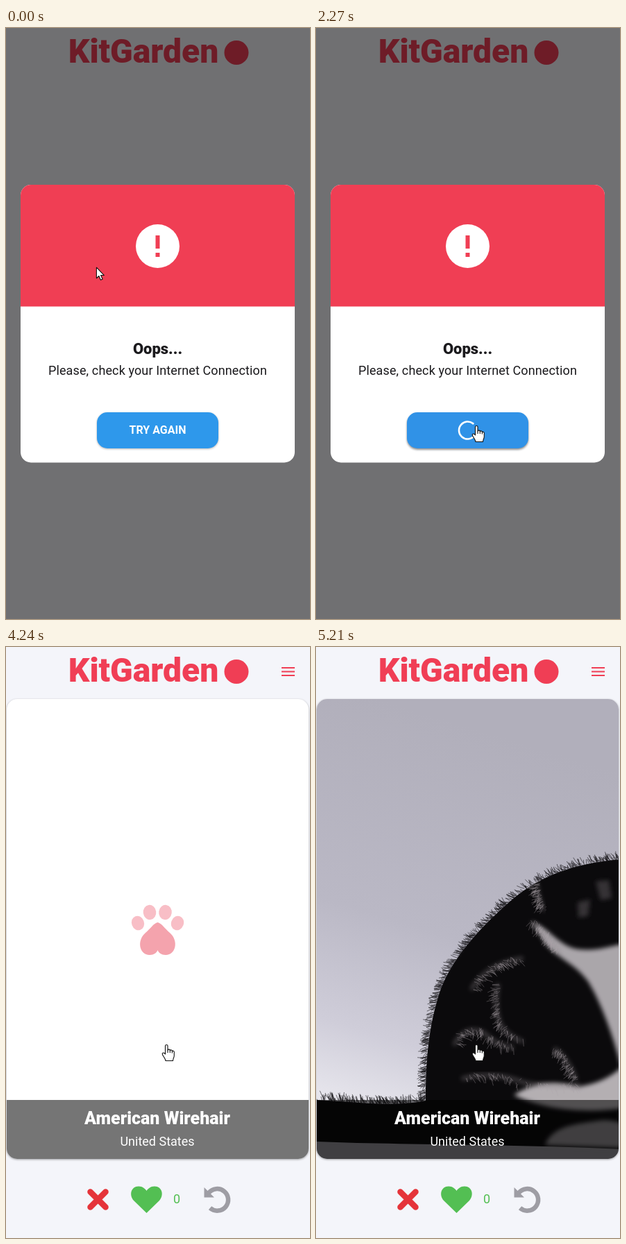
An HTML page that plays this animation: 438x852 px, repeating every 5.45 s.

```html
<!DOCTYPE html>
<html lang="en">
<head>
<meta charset="utf-8">
<title>Cat cards</title>
<style>
  html, body { margin: 0; width: 100%; height: 100%; overflow: hidden; background: #f4f5fa; }
  svg { display: block; width: 100%; height: 100%; }
  text { font-family: Roboto, Arial, sans-serif; font-size: 18px; text-anchor: middle; }
  .black { font-weight: 900; }
  .line { fill: none; stroke-linecap: round; }
</style>
</head>
<body>
<svg id="stage" viewBox="0 0 438 852">
  <defs>
    <clipPath id="cardClip"><rect x="1" y="75" width="435" height="663" rx="15"/></clipPath>
    <clipPath id="modalClip"><rect x="21" y="226" width="395" height="400.500" rx="15"/></clipPath>
    <clipPath id="buttonClip"><rect x="131" y="554" width="175" height="52" rx="15"/></clipPath>
    <linearGradient id="wall" x1=".2" y1="0" x2="0" y2="1">
      <stop offset="0" stop-color="#b1afbb"/>
      <stop offset=".45" stop-color="#bab8c5"/>
      <stop offset=".7" stop-color="#cfcdd9"/>
      <stop offset=".86" stop-color="#e6e5ec"/>
    </linearGradient>
    <filter id="soft" x="-30%" y="-30%" width="160%" height="160%"><feGaussianBlur stdDeviation="3"/></filter>
    <filter id="shade" x="-20%" y="-20%" width="140%" height="150%"><feGaussianBlur stdDeviation="1.500"/></filter>
  </defs>

  <rect width="438" height="852" fill="#f4f5fa"/>
  <g fill="#f03e55">
    <text x="198" y="49.500" class="black" style="font-size:48px">KitGarden</text>
    <circle cx="332" cy="35.500" r="17.500"/>
  </g>

  <g id="page">
    <path class="line" d="M397 30H416M397 35.500H416M397 41H416" stroke="#f03e55" stroke-width="2" style="stroke-linecap:butt"/>
    <rect x="1" y="76" width="435" height="663" rx="15" fill="#000" opacity=".35" filter="url(#shade)"/>
    <g clip-path="url(#cardClip)">
      <rect y="75" width="438" height="664" fill="#fff"/>
      <g id="paw">
        <g fill="#f7b0b9">
          <ellipse cx="190" cy="398" rx="9" ry="10.500" transform="rotate(-20 190 398)"/>
          <ellipse cx="207" cy="382.500" rx="9.300" ry="10.700" transform="rotate(-8 207 382.500)"/>
          <ellipse cx="229.500" cy="382.500" rx="9.300" ry="10.700" transform="rotate(8 229.500 382.500)"/>
          <ellipse cx="247" cy="398" rx="9" ry="10.500" transform="rotate(20 247 398)"/>
        </g>
        <path fill="#f28e9b" d="M218.500 397C213 398 208 406 201 412C188 423 192 444 207 444C213 444 217 441 218.500 437C220 441 224 444 230 444C245 444 249 423 236 412C229 406 224 398 218.500 397Z"/>
      </g>
      <g id="photo">
        <rect y="75" width="438" height="664" fill="url(#wall)"/>
        <rect y="690" width="438" height="50" fill="#8b8a90"/>
        <path id="outline" fill="none" d="M440 306C370 312 325 330 285 362C235 405 195 450 178 498C163 545 158 590 158 654C110 664 50 655 0 653"/>
        <path fill="#0b0a0c" d="M440 306C370 312 325 330 285 362C235 405 195 450 178 498C163 545 158 590 158 654C110 664 50 655 0 653V713C120 718 260 716 440 724Z"/>
        <g filter="url(#soft)">
          <path fill="#aaa6aa" d="M312 397C335 405 345 425 370 434C395 440 415 434 442 428V615C430 565 412 515 392 482C372 455 345 447 330 427Z"/>
          <path fill="#b4afb2" d="M285 646C320 622 355 628 378 634C402 630 424 622 442 604V665C390 672 330 668 285 646Z"/>
          <path fill="#8b888b" d="M330 718C340 692 370 688 400 684C420 680 430 684 442 686V722Z"/>
          <path fill="#343235" d="M377 368L395 364 392 388 378 390ZM403 338L422 336 426 362 410 365Z"/>
        </g>
        <g id="fur" class="line"></g>
      </g>
      <rect y="653" width="438" height="86" fill="#000" opacity=".54"/>
    </g>
    <g fill="#fff">
      <text x="218" y="688" class="black" style="font-size:25px">American Wirehair</text>
      <text x="218" y="719">United States</text>
    </g>
    <path class="line" d="M121.500 785.500L143.500 807.500M143.500 785.500L121.500 807.500" stroke="#e5343a" stroke-width="8.500"/>
    <path fill="#53bf53" d="M202.500 816L184 798C177 790 180 777.500 191 777.500C197 777.500 200.500 781 202.500 784C204.500 781 208 777.500 214 777.500C225 777.500 228 790 221 798Z"/>
    <text x="246" y="801.500" fill="#53bf53">0</text>
    <g fill="#9e9da4">
      <path class="line" d="M292 787A15.800 15.800 0 1 1 294 808.800" stroke="#9e9da4" stroke-width="6.500" style="stroke-linecap:butt"/>
      <path d="M285.500 779V793.500H300Z"/>
    </g>
  </g>

  <g id="dialog">
    <rect width="438" height="852" opacity=".54"/>
    <g clip-path="url(#modalClip)">
      <rect x="21" y="226" width="395" height="401" fill="#fff"/>
      <rect x="21" y="226" width="395" height="175.500" fill="#f03e54"/>
    </g>
    <circle cx="218.500" cy="314.500" r="31.500" fill="#fff"/>
    <path d="M215.500 299H221.500V318H215.500ZM215.500 324H221.500V330H215.500Z" fill="#f03e54"/>
    <g fill="#1b1a1d">
      <text x="218.500" y="470" class="black" style="font-size:22px">Oops...</text>
      <text x="218.500" y="500" style="letter-spacing:.12px">Please, check your Internet Connection</text>
    </g>
    <rect id="shadow" x="131" width="175" height="52" rx="15" filter="url(#shade)"/>
    <g clip-path="url(#buttonClip)">
      <rect id="button" x="131" y="554" width="175" height="52"/>
      <circle id="ripple" cx="232" cy="580" fill="#1b62b8"/>
    </g>
    <text id="label" x="218.500" y="585" fill="#fff" style="font-size:16px;font-weight:700">TRY AGAIN</text>
    <circle id="spinner" r="12.500" class="line" stroke="#fff" stroke-width="2.600" pathLength="360" style="stroke-linecap:square"/>
  </g>

  <g id="cursor" fill="#fff" stroke="#111" stroke-width="1.100" stroke-linejoin="round">
    <path id="arrow" d="M.5 0V15.500L4 12.300L6.500 18L9.200 16.800L6.700 11.300H11.500Z"/>
    <g id="hand">
      <path d="M-1.500 2C-1.500 0 2 0 2 2V8C3 6.500 5.200 7 5.300 8.500C6.500 7.300 8.300 8 8.400 9.500C9.700 8.700 11.300 9.500 11.300 11V16C11.300 19 9.500 20 9.500 23.500H-1C-1 20.500 -5.800 16 -5.800 13.500C-5.800 11.500 -3 11.500 -1.500 14Z"/>
      <path d="M2 8V12M5.300 8.500V12M8.400 9.500V12.500" fill="none"/>
    </g>
  </g>
</svg>

<script>
const LOOP = 5450;
const HOVER = 500, PRESS = 1550, LOADING = 1700, PAGE_READY = 3240, DIALOG_CLOSED = 3820, PHOTO_READY = 4270;
const el = id => document.getElementById(id);
const set = (id, attributes) => Object.entries(attributes).forEach(([k, v]) => el(id).setAttribute(k, v));
const show = (id, visible) => { el(id).style.display = visible ? "" : "none"; };
const clamp = v => Math.min(1, Math.max(0, v));
const progress = (t, start, duration) => clamp((t - start) / duration);
const mix = (a, b, p) => a + (b - a) * p;

let seed = 7;
const random = () => (seed = (seed * 16807) % 2147483647) / 2147483647;

function svgPath(d, stroke, width, opacity = 1) {
  const path = document.createElementNS("http://www.w3.org/2000/svg", "path");
  Object.entries({ d, stroke, "stroke-width": width, opacity, fill: "none" })
    .forEach(([k, v]) => path.setAttribute(k, v));
  return el("fur").appendChild(path);
}

// Short curved hairs growing outward from a guide line.
function growHairs(guide, count, length, color, spread, opacity) {
  const total = guide.getTotalLength();
  let d = "";
  for (let i = 0; i < count; i++) {
    const at = random() * total;
    const a = guide.getPointAtLength(at), b = guide.getPointAtLength(Math.min(total, at + 1));
    const tx = b.x - a.x, ty = b.y - a.y;
    const out = length * (0.3 + random()), lean = length * (random() - 0.2);
    const x = a.x + (random() - 0.5) * spread, y = a.y + (random() - 0.5) * spread;
    const dx = -ty * out + tx * lean, dy = tx * out + ty * lean;
    d += `M${x} ${y}q${dx * 0.6} ${dy * 0.4} ${dx} ${dy}`;
  }
  svgPath(d, color, 0.8, opacity);
}

growHairs(el("outline"), 750, 9, "#171519", 4, 0.75);
const markings = [
  "M318 342Q318 360 328 378",
  "M225 492Q245 458 296 449",
  "M262 488Q256 520 266 545Q278 562 296 568",
  "M200 572Q215 545 240 555Q262 575 282 577",
  "M212 622Q255 610 300 628Q340 636 378 632",
  "M345 580Q362 592 374 622",
  "M312 398Q330 412 350 438"
];
for (const d of markings) {
  const guide = svgPath(d, "#8d868b", 6, 0.38);
  guide.setAttribute("filter", "url(#soft)");
  growHairs(guide, 75, 8, "#aaa3a7", 10, 0.45);
}

function cubicEase(x1, y1, x2, y2) {
  const bezier = (a, b, u) => 3 * a * u * (1 - u) ** 2 + 3 * b * u * u * (1 - u) + u ** 3;
  return x => {
    let low = 0, high = 1;
    for (let i = 0; i < 20; i++) {
      const u = (low + high) / 2;
      if (bezier(x1, x2, u) < x) low = u; else high = u;
    }
    return bezier(y1, y2, low);
  };
}
const fastOutSlowIn = cubicEase(0.4, 0, 0.2, 1);

const cursorStops = [
  [0, 130, 345], [170, 92, 420], [340, 92, 545], [450, 118, 603],
  [550, 165, 592], [750, 212, 566], [950, 234, 568], [1120, 231, 573]
];
function cursorAt(t) {
  const last = cursorStops.length - 1;
  if (t >= cursorStops[last][0]) return cursorStops[last].slice(1);
  const i = cursorStops.findIndex(stop => stop[0] > t) - 1;
  const [p0, p1, p2, p3] = [i - 1, i, i + 1, i + 2].map(k => cursorStops[Math.min(last, Math.max(0, k))]);
  const u = (t - p1[0]) / (p2[0] - p1[0]);
  return [1, 2].map(k => p1[k] + 0.5 * u * (p2[k] - p0[k]
    + u * (2 * p0[k] - 5 * p1[k] + 4 * p2[k] - p3[k] + u * (3 * (p1[k] - p2[k]) + p3[k] - p0[k]))));
}

function drawSpinner(elapsed) {
  const cycle = (elapsed / 1333) % 1, turn = (elapsed / 2222) % 1;
  const head = fastOutSlowIn(clamp(cycle * 2)), tail = fastOutSlowIn(clamp(cycle * 2 - 1));
  const start = -90 + tail * 270 + turn * 360 + cycle * 90;
  set("spinner", {
    transform: `translate(218.5 580) rotate(${start})`,
    "stroke-dasharray": `${Math.max(0.1, (head - tail) * 270)} 360`
  });
}

function draw(t) {
  const hover = progress(t, HOVER, 200);
  const loading = t >= LOADING;
  show("page", t >= PAGE_READY);
  show("dialog", t < DIALOG_CLOSED);
  show("label", !loading);
  show("spinner", loading);
  if (loading) drawSpinner(t - LOADING);

  set("button", { fill: `rgb(${mix(46, 48, hover)},${mix(152, 146, hover)},${mix(235, 231, hover)})` });
  set("shadow", { y: mix(555, 556, hover), opacity: mix(0.3, 0.45, hover) });
  set("ripple", {
    r: mix(26, 125, fastOutSlowIn(progress(t, PRESS, 300))),
    opacity: t < PRESS ? 0 : 0.13 * (1 - progress(t, LOADING, 390))
  });

  const reveal = progress(t, PHOTO_READY, 290);
  set("paw", { opacity: reveal > 0 ? 0 : 0.9 + 0.1 * Math.cos((t - DIALOG_CLOSED) / 1000 * 2 * Math.PI) });
  set("photo", { opacity: reveal });

  const pointing = t >= HOVER;
  show("arrow", !pointing);
  show("hand", pointing);
  set("cursor", { transform: `translate(${cursorAt(t).join(" ")})` });
}

const begin = performance.now();
function tick() {
  draw((performance.now() - begin) % LOOP);
  requestAnimationFrame(tick);
}
tick();
</script>
</body>
</html>
```
